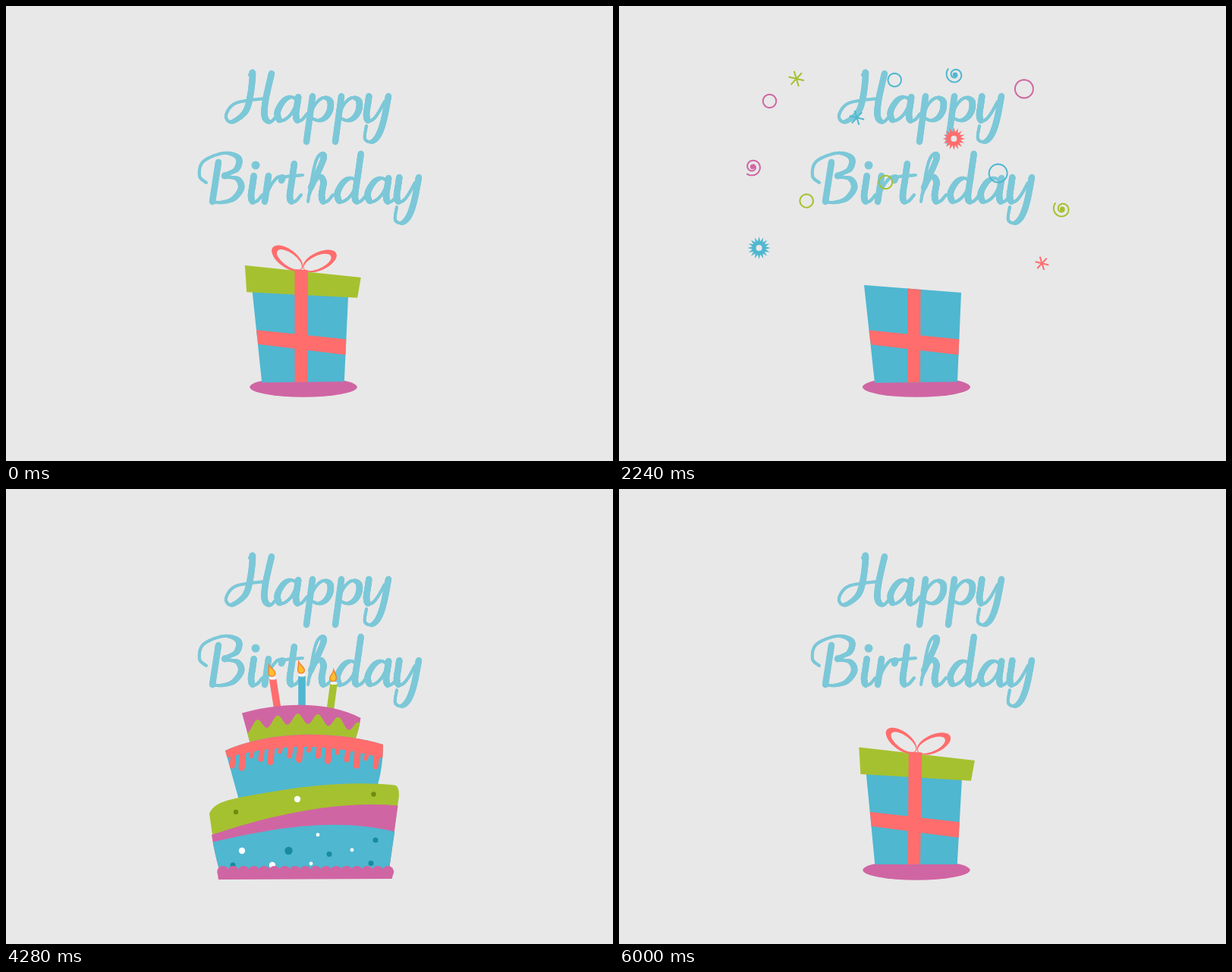
An HTML page with a canvas that plays this animation: 800 by 600 pixels, repeating every 6.04 s.

```html
<!DOCTYPE html>
<html lang="en">
<head>
<meta charset="utf-8">
<title>Happy Birthday</title>
<style>
html, body { margin: 0; width: 100%; height: 100%; overflow: hidden; background: #e8e8e8; }
canvas { display: block; }
</style>
</head>
<body>
<canvas id="stage" width="800" height="600" role="img" aria-label="Happy Birthday"></canvas>
<script>
const LOOP = 6040, STEP = 40, TAU = Math.PI * 2, DEG = Math.PI / 180;
const BG = '#e8e8e8', BLUE = '#4fb7d0', GREEN = '#a6c12f', CORAL = '#ff6d6d', PINK = '#d065a3';
const PURPLE = '#ac738d', TEAL = '#188ba0', OLIVE = '#6f8c12', INK = '#7cc8d8';
const ctx = document.getElementById('stage').getContext('2d');

const clamp = v => Math.max(0, Math.min(1, v));
const span = (t, a, b) => clamp((t - a) / (b - a));
const pairs = v => Array.from({ length: v.length / 2 }, (_, i) => [v[2 * i], v[2 * i + 1]]);

// Catmull-Rom curve through a flat list of x, y
function spline(list, n = 12) {
  const pts = pairs(list), last = pts.length - 1, out = [];
  const at = i => pts[Math.max(0, Math.min(last, i))];
  for (let i = 0; i < last; i++) {
    const a = at(i - 1), b = at(i), c = at(i + 1), d = at(i + 2);
    for (let k = 0; k < n; k++) {
      const u = k / n;
      out.push(b.map((_, j) => b[j] + u * (c[j] - a[j]) / 2 +
        u * u * (a[j] - 2.5 * b[j] + 2 * c[j] - d[j] / 2) +
        u * u * u * (1.5 * (b[j] - c[j]) + (d[j] - a[j]) / 2)));
    }
  }
  return [...out, at(last)];
}

function group(draw) {
  ctx.save();
  draw();
  ctx.restore();
}
function fillPath(color, d) {
  const path = new Path2D(d);
  ctx.fillStyle = color;
  ctx.fill(path);
  return path;
}
function poly(color, pts) {
  ctx.fillStyle = color;
  ctx.beginPath();
  pts.forEach(p => ctx.lineTo(...p));
  ctx.fill();
}
const quad = (color, ...v) => poly(color, pairs(v));
function dot(color, x, y, r, ry = r) {
  ctx.fillStyle = color;
  ctx.beginPath();
  ctx.ellipse(x, y, r, ry, 0, 0, TAU);
  ctx.fill();
}
const dots = (color, r, ...v) => pairs(v).forEach(p => dot(color, ...p, r));
function pivot(x, y, rot, sx = 1, sy = sx) {
  ctx.translate(x, y);
  ctx.rotate(rot);
  ctx.scale(sx, sy);
  ctx.translate(-x, -y);
}
function clipTop(y) {
  ctx.beginPath();
  ctx.rect(0, y, 800, 600 - y);
  ctx.clip();
}

// Lettering: letters share strokes, the pen presses on the way down
const hook = (x, top, base) => [x + 0.14 * (base - top - 10), top, x + 0.07 * (base - top - 10), (top + base - 10) / 2,
  x, base - 10, x + 2, base - 2, x + 8, base - 3, x + 15, base - 11];
const bowl = [385,125, 376,120, 366,125, 358,139, 360,150, 367,150, 376,142, 384,127];
const glyphs = {
  H: [[321,91, 325,89, 322,118, 315,140, 297,153, 290,144, 303,128, 341,122],
    [350,89, 342,125, 341,146, 348,153, 355,147]],
  a: [bowl, hook(382, 120, 153)],
  d: [bowl, hook(381, 88, 153)],
  p: [[404,119, 396,179], [401,143, 408,129, 418,121, 427,125, 427,137, 421,147, 412,151, 403,148]],
  y: [[...hook(475, 119, 153), 499, 126], [504,119, 498,150, 491,170, 482,179, 473,175, 475,158]],
  B: [[264,233, 255,224, 260,205, 287,194, 306,200, 304,215, 288,224, 305,228, 310,240, 300,254, 284,259, 271,258],
    [280,206, 272,258]],
  i: [hook(323, 224, 260)],
  r: [[346,224, 341,258], [343,249, 350,235, 358,226, 364,226, 363,230]],
  t: [hook(374, 208, 260), [368,225, 391,223]],
  h: [[398,258, 405,218, 410,201, 416,195, 418,203, 402,239], [399,250, 406,234, 414,225, ...hook(416, 232, 260)]]
};
const text = ['H', 'a', 'p', 'p 38', 'y', 'B', 'i', 'r', 't', 'h', 'd 79 107', 'a 119 107', 'y 40 107'];

function write(pen) {
  pen.strokeStyle = pen.fillStyle = INK;
  pen.lineCap = 'round';
  for (const item of text) {
    const [name, dx = 0, dy = 0] = item.split(' ');
    pen.setTransform(1, 0, 0, 1, dx, dy);
    for (const stroke of glyphs[name]) {
      spline(stroke).forEach(([x, y], i, pts) => {
        if (!i) return;
        const [px, py] = pts[i - 1];
        pen.lineWidth = 4 + 4.5 * Math.max(0, (y - py) / Math.hypot(x - px, y - py));
        pen.beginPath();
        pen.moveTo(px, py);
        pen.lineTo(x, y);
        pen.stroke();
      });
    }
  }
  pen.setTransform(1, 0, 0, 1, 0, 0);
  pen.beginPath();
  pen.arc(329, 210, 5.5, 0, TAU);
  pen.fill();
}
const lettering = document.createElement('canvas');
lettering.width = 800;
lettering.height = 600;
write(lettering.getContext('2d'));

// Gift
function petal(x, y, rot, dx) {
  const path = new Path2D(), hole = new Path2D();
  path.ellipse(x, y, 24, 12, rot * DEG, 0, TAU);
  hole.ellipse(x + dx, y + 1.8, 19.5, 8.5, rot * DEG, 0, TAU);
  path.addPath(hole);
  ctx.fillStyle = CORAL;
  ctx.fill(path, 'evenodd');
}
function lid() {
  quad(GREEN, 314,342, 467.5,357.5, 463,384.5, 316.5,377.5);
  quad(CORAL, 380,347, 397.5,348, 397.5,383, 380,383);
  petal(370, 332.5, 36, 2.8);
  petal(413, 336, -25, -3);
}
function box() {
  quad(BLUE, 323,368, 451,378, 446,495.5, 337,497);
  quad(CORAL, 380,372.5, 397.5,374, 397,496, 380.5,496.5);
  quad(CORAL, 329.5,427.5, 448.3,439.5, 447.5,460, 332,446.5);
}
function flyingLid(t) {
  const p = (t - 400) / 280;
  clipTop(35);
  ctx.translate(0, -352 * Math.pow(p, 1.3));
  pivot(390, 364, 40 * p * DEG);
  lid();
}

function balloon(x, y, rot, sx, sy, color, patch, px, py, wx, wy) {
  group(() => {
    ctx.translate(x, y);
    ctx.rotate(rot * DEG);
    ctx.scale(sx, sy);
    const body = fillPath(color, 'M0-45C23-45 38-27 38-6C38 20 18 45 0 45C-18 45-38 20-38-6C-38-27-23-45 0-45Z');
    fillPath(color, 'M-3 43L3 43L5.5 52L-5.5 52Z');
    ctx.clip(body);
    ctx.scale(1 / sx, 1 / sy);
    ctx.rotate(-rot * DEG);
    dot(patch, px, py, 16.8);
    dot('#fff', wx, wy, 5);
  });
}
function string(color, d) {
  ctx.strokeStyle = color;
  ctx.lineWidth = 2;
  ctx.stroke(new Path2D(d));
}
function balloons(t) {
  const u = (t - 440) / 640;
  if (u < 0 || u > 1.1) return;
  const drift = Math.max(0, u - 0.375) * 48;
  group(() => {
    ctx.clip(new Path2D('M200 35H600V390L200 359Z'));
    pivot(390, 374, 0, Math.min(1, 0.55 + 1.2 * u));
    ctx.translate(-drift, 155.7 - 505 * Math.pow(u, 1.2));
    string('#b5c95a', 'M360 322Q362 352 371 376');
    balloon(342, 278.5, -23, 0.95, 0.95, PURPLE, CORAL, 8.5, -14.5, -8.5, -35);
    ctx.translate(drift, 0);
    string('#8cc0c0', 'M400 317Q390 350 393.5 382');
    balloon(399.5, 268, 0, 0.92, 1, CORAL, GREEN, 13.5, -11, 4.5, -35);
    ctx.translate(drift, 0);
    string(PINK, 'M428 316Q405 352 401 382');
    balloon(442, 271, 17, 1, 1, GREEN, BLUE, 15, -7.5, 13.5, -35);
  });
}

// Confetti: resting places per kind, colours in turn
const bits = {
  ring: [[PINK, BLUE, GREEN], 211,141.5, 365,115.5, 354,241.5, 524.5,126.5, 492.5,230.5, 256.5,264.5],
  star: [[GREEN, BLUE, CORAL], 244,114, 318.5,162, 546.5,341.5],
  curl: [[BLUE, PINK, GREEN], 439.5,109, 190,222.5, 571.5,274.5],
  burst: [[CORAL, BLUE], 438,188, 198,322.5]
};
function trace(n, radius, angle) {
  ctx.beginPath();
  for (let i = 0; i <= n; i++) {
    const r = radius(i), a = angle(i) * DEG;
    ctx.lineTo(r * Math.cos(a), r * Math.sin(a));
  }
}
const shapes = {
  ring(color, i) {
    const r = i % 5 > 2 ? 12 : 8.7;
    trace(40, () => r, k => k * 9);
    ctx.stroke();
  },
  star(color, i) {
    trace(12, k => k % 2 * (10.5 - i * 0.7), k => k * 30 - 17);
    ctx.stroke();
  },
  curl(color, i) {
    const end = i % 2 ? 130 : 223;
    trace(60, k => 2 + k / 6, k => end - 10 * (60 - k));
    ctx.stroke();
    dot(color, 0, 0, 3.2);
  },
  burst(color) {
    trace(32, k => k % 2 ? 8.8 : 15, k => k * 11.25);
    ctx.fill();
    dot(BG, 0, 0, 4);
  }
};
function confetti(t) {
  if (t < 1000 || t > 2480) return;
  const u = span(t, 1000, 1808), spread = 1.07 * (1 - Math.pow(1 - u, 3));
  group(() => {
    ctx.globalAlpha = 1 - span(t, 2280, 2480);
    ctx.lineWidth = 2;
    for (const kind in bits) {
      const [colors, ...places] = bits[kind];
      pairs(places).forEach(([x, y], i) => group(() => {
        const color = colors[i % colors.length], size = clamp(u * 3);
        ctx.translate(390 + (x - 390) * spread, 372 + (y - 372) * spread);
        ctx.scale(size, size);
        ctx.strokeStyle = ctx.fillStyle = color;
        shapes[kind](color, i);
      }));
    }
  });
}

function gift(t) {
  const closed = t < 400 || t >= 5560, since = t < 400 ? t + 480 : t - 5560;
  let scale = 1, rot = 0;
  if (closed) {
    scale = 1 - Math.exp(-since / 85) * Math.cos(TAU * since / 480);
    rot = since < 640 ? 14 * DEG * Math.exp(-since / 158) * Math.cos(TAU * since / 400) : 0;
  } else {
    const u = span(t, 2360, 2600);
    scale = 1 + 0.6 * u - 1.6 * u * u;
  }
  if (scale <= 0) return;
  group(() => {
    pivot(392, 502.5, 0, scale);
    dot(PINK, 392, 502.5, 71, 13.3);
  });
  balloons(t);
  confetti(t);
  group(() => {
    ctx.translate(0, -100 * Math.abs(rot));
    pivot(392, 498, rot, scale);
    box();
    if (closed) lid();
  });
  if (!closed && t < 1000) group(() => flyingLid(t));
}

// Cake
const arch = (x, top, bend) => top + bend * (x - 392) ** 2;
function ridge(from, to, y) {
  const pts = [];
  for (let x = from; x <= to; x += 2) pts.push([x, y(x)]);
  return pts;
}
function plate() {
  quad(PINK, 278.5,505, 511.5,504, 508.5,514, 280,515);
  for (let i = 0; i < 17; i++) dot(PINK, 286 + i * 13.58, 504.6, 7.7);
}
function bottomTier() {
  fillPath(GREEN, 'M268 428C275 411 300 408 340 401C400 390 460 385 512 390.5Q518 391 518 404L504 508L283 509Q273 468 268 428Z');
  fillPath(PINK, 'M271 456C320 440 420 409 516.5 417.5L504 508L283 509Q275 482 271 456Z');
  fillPath(BLUE, 'M272.5 465.5C340 450 430 431 512.3 452L504 508L283 509Q276 484 272.5 465.5Z');
  dots('#fff', 4.2, 384,409, 311,477, 351,496);
  dots('#fff', 2.4, 411,456, 456,476, 402,494);
  dots(TEAL, 5.2, 372.5,477);
  dots(TEAL, 3.5, 426,481.5, 487,463, 481,493.5, 299,496);
  dots(OLIVE, 3.2, 303,426, 484.5,402.5);
}
function middleTier() {
  ctx.clip(fillPath(BLUE, 'M289 345C350 317 440 319 497 337Q497 365 490 390L307 410Z'));
  const rim = x => arch(x, 340, 0.0014);
  poly(CORAL, [[280, 310], ...ridge(280, 510, rim), [510, 310]]);
  ctx.strokeStyle = CORAL;
  ctx.lineCap = 'round';
  for (let i = 0; i < 16; i++) {
    const x = 298 + i * 12.6, swing = Math.sin(i * 2.1);
    ctx.lineWidth = 7 + swing * 1.5;
    ctx.beginPath();
    ctx.moveTo(x + 2, rim(x) - 3);
    ctx.lineTo(x, arch(x, 351, 0.0016) + swing * 7);
    ctx.stroke();
  }
}
function topTier() {
  ctx.clip(fillPath(PINK, 'M311 295.5C360 281 425 279 467.5 302Q465 318 460 331L322 336Z'));
  const wave = x => arch(x, 303, 0.0022) - 7 * Math.cos(TAU * (x - 331) / 26.75);
  poly(GREEN, [...ridge(310, 470, wave), [470, 345], [310, 345]]);
}
function flame(x, y, lean, t) {
  const s = span(t, 4080, 4240), tip = lean + 1.2 * Math.sin(t / 70 + x);
  const shape = `M${tip}-18C${tip + 2}-12 5-9 5-4C5 2-4 2-5-3C-5-8 ${tip}-11 ${tip}-18Z`;
  group(() => {
    ctx.translate(x, y);
    ctx.scale(s, s);
    fillPath('#f57f2a', shape);
    ctx.translate(0, -1);
    ctx.scale(0.72, 0.72);
    fillPath('#fcc02e', shape);
  });
}
function candle(color, x, y, slant, lean, t) {
  quad(color, x - 4.8,y, x + 4.8,y, x + 4.8 + slant,y + 44, x - 4.8 + slant,y + 44);
  dot('#f3f3f3', x, y - 0.5, 4.8, 2);
  flame(x - 1, y - 3, lean, t);
}
function candles(t) {
  candle(CORAL, 351.5, 250, 7, -4.5, t);
  candle(BLUE, 390, 246, 0, -3, t);
  candle(GREEN, 432, 256.5, -6, -0.5, t);
}

// Tiers from back to front; each drops in, the lowest first
const parts = [candles, topTier, middleTier, bottomTier]
  .map((draw, i) => ({ draw, start: 2720 + 360 * (3 - i) }));

function cake(t) {
  let wobble = 0;
  for (const { start } of parts) {
    const d = Math.max(0, t - start - 300);
    wobble += 0.025 * Math.exp(-d / 80) * Math.sin(TAU * d / 180);
  }
  const u = Math.max(0, (t - 4800) / 480);
  group(() => {
    if (t < 4200) clipTop(74);
    ctx.translate(32 * u, 35 * Math.pow(u, 5));
    pivot(394, 515, 60 * DEG * Math.pow(u, 1.6), 1 + wobble * 0.6, 1 - wobble);
    for (const { draw, start } of parts) {
      const dy = -450 * (1 - span(t, start, start + 300) ** 2);
      if (t >= start) group(() => {
        ctx.translate(dy * 0.024, dy);
        draw(t);
      });
    }
    pivot(394, 514, 0, 1 - (1 - span(t, 2600, 2760)) ** 3);
    plate();
  });
}

function frame(now) {
  const t = Math.floor((Math.max(0, now - begin) % LOOP) / STEP) * STEP;
  ctx.fillStyle = BG;
  ctx.fillRect(0, 0, 800, 600);
  ctx.drawImage(lettering, 0, 0);
  if (t >= 2600 && t < 5560) cake(t);
  else gift(t);
  requestAnimationFrame(frame);
}
const begin = performance.now();
requestAnimationFrame(frame);
</script>
</body>
</html>
```
